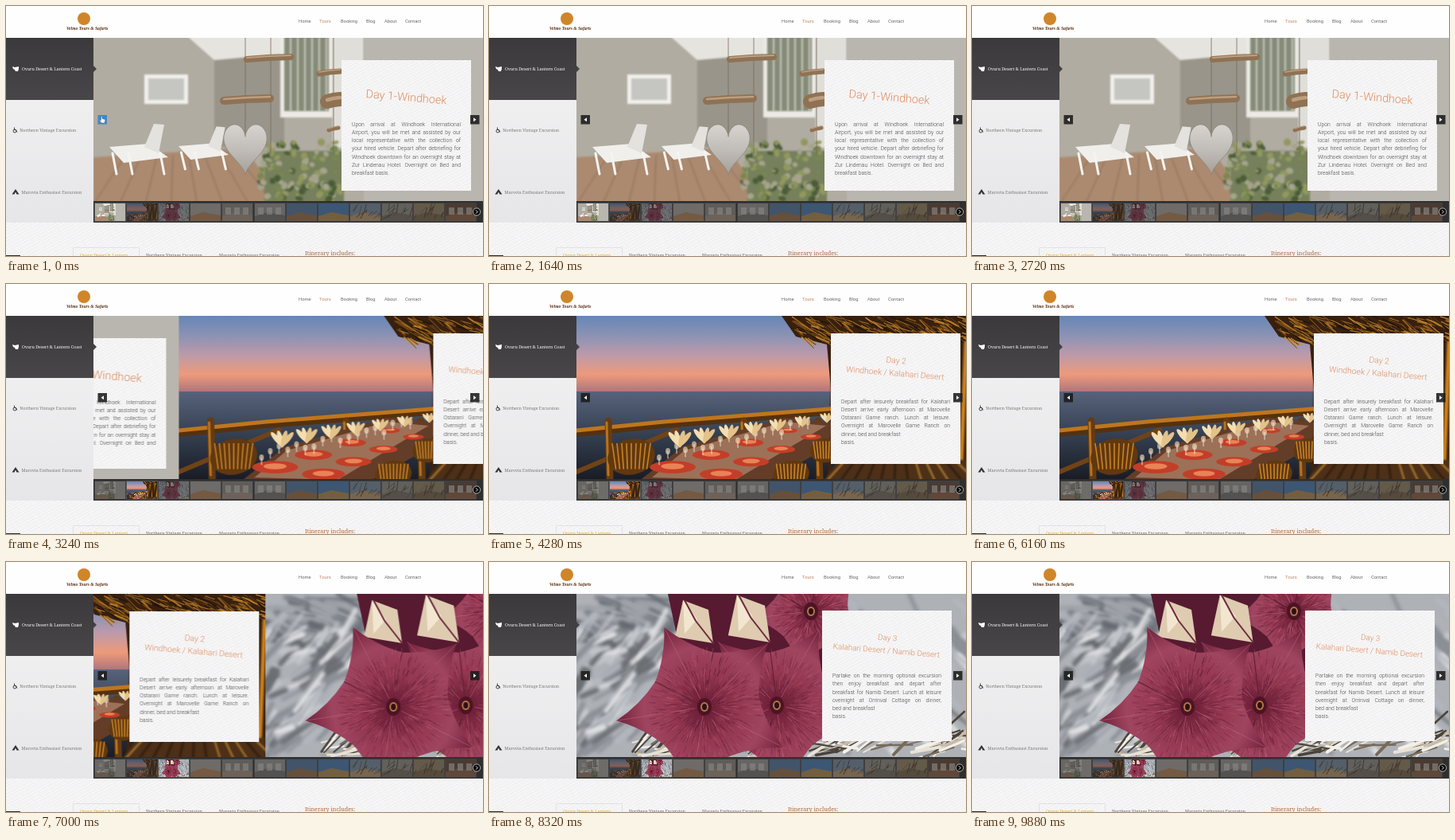
These frames come from a looping animation (600 px wide and 314 px high, 10 s). An HTML page with a canvas:

```html
<!DOCTYPE html>
<html lang="en">
<head>
<meta charset="utf-8">
<title>Safari tour slider</title>
<style>
html, body { margin: 0; width: 100%; height: 100%; overflow: hidden; }
#stage { position: relative; width: 600px; height: 314px; overflow: hidden; }
#stage, .panel {
  background: repeating-linear-gradient(28deg, #0000 0 2px, #e9e7ea66 2px 3px),
    repeating-linear-gradient(-28deg, #0000 0 3px, #fff8 3px 4px), #f5f4f5;
}
#slider { position: absolute; left: 110px; top: 40px; width: 490px; height: 205px; overflow: hidden; }
#track { position: absolute; display: flex; will-change: transform; }
.slide { position: relative; flex: none; width: 491px; height: 205px; }
.panel { position: absolute; width: 163px; height: 163.5px; font: 300 6.8px/10.25px Roboto, sans-serif; color: #444; }
.panel h2 {
  position: absolute; left: -20px; width: 203px; margin: 0; text-align: center; white-space: nowrap;
  font-weight: 300; line-height: 15.5px; color: #dc8c5c; transform: translateY(-50%) rotate(4.7deg);
}
.panel div { position: absolute; left: 13px; width: 137px; white-space: nowrap; }
.panel p { margin: 0; text-align: justify; }
.panel .full { text-align-last: justify; }
#strip { position: absolute; left: 110px; top: 245px; width: 490px; height: 27px; background: #2f2f30; overflow: hidden; }
#strip canvas { position: absolute; top: 2.5px; outline: .5px solid #555; }
svg { position: absolute; left: 0; top: 0; }
.serif { font: 5.3px "Noto Serif", serif; }
.menu { font: 5.8px Roboto, sans-serif; fill: #666; }
</style>
</head>
<body>
<div id="stage">
  <div id="slider"><div id="track"></div></div>
  <div id="strip"></div>
  <svg width="600" height="314" viewBox="0 0 600 314">
    <defs>
      <linearGradient id="dark" x2="0" y2="1"><stop stop-color="#3b393b"/><stop offset="1" stop-color="#484648"/></linearGradient>
      <linearGradient id="pale" x2="0" y2="1"><stop stop-color="#efeff0"/><stop offset="1" stop-color="#e6e6e8"/></linearGradient>
    </defs>
    <path fill="#fefefe" d="M0 0H600V40H0z"/>
    <circle cx="98" cy="16" r="8" fill="#cf852a"/>
    <text x="76" y="29.5" font-family="Liberation Serif, serif" font-size="5.6" font-style="italic" font-weight="bold" fill="#5a2d12">Velmo Tours &amp; Safaris</text>
    <g class="menu">
      <text x="368" y="21.3">Home</text><text x="394" y="21.3" fill="#c08560">Tours</text>
      <text x="421" y="21.3">Booking</text><text x="453" y="21.3">Blog</text>
      <text x="476" y="21.3">About</text><text x="502" y="21.3">Contact</text>
    </g>
    <path fill="url(#pale)" d="M0 118H110V272H0z"/>
    <path fill="url(#dark)" d="M0 40H110V118H0z"/>
    <path fill="#434143" d="M110 75l4 4-4 4z"/>
    <g class="serif" fill="#777">
      <text x="20" y="80.6" fill="#fff">Ovaru Desert &amp; Lantern Coast</text>
      <text x="17.3" y="158">Northern Vintage Excursion</text>
      <text x="19.5" y="235.5">Marovia Enthusiast Excursion</text>
    </g>
    <path fill="#fff" d="M8 76l3 1 5-1v3l-1 3h-3l-1-2-2-1z"/>
    <g fill="none" stroke="#444"><circle cx="11" cy="157" r="2"/><path d="M10.5 152.5v3h2l1.5 3"/></g>
    <path fill="#333" d="M12 230l4.5 6.5h-3L12 233.5l-1.5 3h-3z"/>
    <path fill="none" stroke="#e2e1e3" d="M84.5 314V303.5H167.5V314"/>
    <g class="serif" fill="#666">
      <text x="93" y="315" fill="#dfb018">Ovaru Desert &amp; Lantern</text>
      <text x="176" y="315">Northern Vintage Excursion</text>
      <text x="268" y="315">Marovia Enthusiast Excursion</text>
      <text x="376" y="312.8" style="font-size:7.2px" fill="#a8673c">Itinerary includes:</text>
    </g>
    <path fill="#2a2a22" d="M0 313H18V314H0z"/>
    <path id="prev" fill-opacity=".88" d="M115.5 137H127V148.5H115.5z"/>
    <path id="prevMark" fill="#fff" d="M123 140.3v5l-3.5-2.5z"/>
    <path fill="#1c1c1c" fill-opacity=".88" d="M584 137H595.5V148.5H584z"/>
    <path fill="#fff" d="M588 140.3v5l3.5-2.5z"/>
    <circle cx="592" cy="258.5" r="4.6" stroke="#ddd" stroke-width=".8"/>
    <path fill="none" stroke="#fff" d="M591 256.3l2.2 2.2-2.2 2.2"/>
    <path id="hand" fill="#fff" stroke="#456" stroke-width=".5" d="M119.5 139q1-1 1.5 0v2.500l3 .8q1 .3.800 1.500L124 147h-4l-2.500-3.500q0-1 2 .3z"/>
  </svg>
</div>
<script>
const WIDTH = 491, HEIGHT = 205, LEFT = 110, TOP = 40, LOOP = 10000;
const STARTS = [2840, 6783], TAU = 270, FADE = 200, HOVER_END = 440;
const $ = id => document.getElementById(id);
const lerp = (a, b, u) => a + (b - a) * u;
const times = (n, fn) => { for (let i = 0; i < n; i++) fn(i, i / (n - 1)); };

let seed = 7, g;
const rnd = (a, b) => lerp(a, b, (seed = seed * 16807 % 2147483647) / 2147483647);
const pick = list => list[Math.floor(rnd(0, list.length))];

// Drawing helpers work on the current context, in stage coordinates.
function makeCanvas(w, h) {
  const c = document.createElement('canvas');
  c.width = w; c.height = h;
  g = c.getContext('2d');
  return c;
}
function trace(pts) {
  g.beginPath();
  for (let i = 0; i < pts.length; i += 2) g.lineTo(pts[i], pts[i + 1]);
}
function poly(color, ...pts) { trace(pts); g.fillStyle = color; g.fill(); }
function line(color, width, ...pts) {
  trace(pts); g.lineCap = g.lineJoin = 'round';
  g.strokeStyle = color; g.lineWidth = width; g.stroke();
}
function rect(color, x, y, w, h) { g.fillStyle = color; g.fillRect(x, y, w, h); }
function oval(color, x, y, rx, ry = rx, turn = 0) {
  g.beginPath(); g.ellipse(x, y, rx, ry, turn, 0, 7); g.fillStyle = color; g.fill();
}
function shade(y0, y1, ...colors) {
  const s = g.createLinearGradient(0, y0, 0, y1);
  colors.forEach((c, i) => s.addColorStop(i / (colors.length - 1), c));
  return s;
}
const soft = px => g.filter = px ? `blur(${px}px)` : 'none';
function blobs(n, colors, x, y, w, h, r) {
  times(n, () => oval(pick(colors), rnd(x, x + w), rnd(y, y + h), rnd(r / 2, r), rnd(r / 3, r), rnd(0, 3)));
}
function streaks(n, colors, x, y, w, h, length, angle, spread, thick) {
  times(n, () => {
    const px = rnd(x, x + w), py = rnd(y, y + h), a = angle + rnd(-spread, spread), d = rnd(length / 3, length);
    line(pick(colors), rnd(thick / 3, thick), px, py, px + d * Math.cos(a), py + d * Math.sin(a));
  });
}

function lounger(x, y, s) {
  poly('#f0efec', x, y, x + 50 * s, y - 4 * s, x + 74 * s, y + 13 * s, x + 18 * s, y + 20 * s);
  poly('#e3e2de', x + 44 * s, y, x + 56 * s, y - 29 * s, x + 69 * s, y - 28 * s, x + 62 * s, y + 8 * s);
  for (const dx of [4, 24, 64]) line('#f5f4f1', 3, x + dx * s, y + 8, x + dx * s + 5, y + 34 * s);
}
function driftwood(x, y, w, thick) {
  line('#8f7254', thick, x, y, x + w / 2, y - 2, x + w, y - 3);
  line('#bd9f80', thick / 4, x, y - 2, x + w / 2, y - 4, x + w, y - 5);
}
function heart(cx, cy, sx, sy) {
  const pts = [];
  times(60, (i, u) => {
    const a = u * 2 * Math.PI;
    pts.push(cx + sx * Math.sin(a) ** 3 * 16,
      cy - sy * (13 * Math.cos(a) - 5 * Math.cos(2 * a) - 2 * Math.cos(3 * a) - Math.cos(4 * a)));
  });
  poly(shade(148, 214, '#d8d5d0', '#c0bcb7', '#a29d97'), ...pts);
  line('#8b847c', .8, ...pts);
}
function patio() {
  rect('#b1aca1', LEFT, TOP, WIDTH, HEIGHT);
  soft(1);
  rect('#99958a', 262, 62, 88, 115);
  poly('#e6e4df', 228, 38, 352, 38, 352, 60, 262, 68);
  rect('#f1f0ec', 174, 86, 55, 37);
  rect('#c5c6c1', 179, 91, 45, 27);
  rect('#eceae5', 345, 38, 66, 102);
  rect('#868b78', 350, 38, 56, 94);
  times(6, i => line('#dfded8', 1.5, 358 + i * 9, TOP, 358 + i * 9, 132));
  rect('#e0ded8', 411, 38, 39, 140);
  rect('#b9b6af', 450, 38, 152, 210);
  poly('#ab8a70', 110, 190, 300, 178, 350, 248, 110, 248);
  times(8, i => line('#856650', .8, 150 + i * 20, 188, 112 + i * 32, 246));
  rect('#76805c', 325, 182, 100, 65);
  blobs(110, ['#78884f', '#4a5c38', '#91985f', '#a5a48c'], 318, 170, 104, 75, 5);
  soft(.5);
  lounger(130, 177, 1);
  lounger(217, 176, .85);
  soft(0);
  for (const x of [301, 333, 412]) line('#786b5c', .8, x, TOP, x, 185);
  driftwood(303, 67, 55, 8);
  driftwood(274, 119, 58, 10);
  driftwood(394, 85, 26, 7);
  driftwood(404, 120, 16, 18);
  driftwood(406, 156, 12, 5);
  heart(301, 175, 1.7, 2.2);
}

function napkin(x, y, s) {
  for (const a of [-.7, -.25, .25, .7])
    oval(a > 0 ? '#e3c38a' : '#f4deb0', x + a * 9 * s, y - 3 * s, 3 * s, 10 * s, a);
}
function placemat(x, y, r) {
  oval('#c33e28', x, y, r, r * .27);
  oval('#e98355', x, y - 1, r * .5, r * .13);
}
function chair(x, y, w) {
  oval('#61380f', x, y, w, w * .75, -.2);
  times(9, (i, u) => line('#c98428', 1.6, x + (u - .5) * w * 1.6, y - w * .55, x + (u - .5) * w * 1.3, y + w * .5));
}
function dinner() {
  rect(shade(TOP, 138, '#6687b6', '#8b92b4', '#bc9aaa', '#ed9a7b', '#a8707c'), LEFT, TOP, WIDTH, 98);
  rect(shade(135, 245, '#57637b', '#343f50', '#191c25'), LEFT, 135, WIDTH, 110);
  poly('#38200f', 368, TOP, 601, TOP, 601, 245, 440, 245, 425, 76, 386, 66);
  streaks(260, ['#754817', '#23150d', '#aa7224', '#c98a2c'], 380, 40, 220, 30, 26, .5, .3, 1.5);
  soft(1);
  times(16, i => line(pick(['#cf851e', '#8d541c', '#40240e']), 5, 435 + i * 11, 74, 428 + i * 11, 248));
  poly('#4d3017', 420, 248, 440, 221, 601, 221, 601, 248);
  times(12, i => line(pick(['#b98336', '#2a190c']), 2, 425 + i * 17, 247, 446 + i * 13, 224));
  soft(0);
  for (const [color, w, dy] of [['#55310f', 10, 0], ['#bf761d', 5, -3]])
    line(color, w, LEFT, 187 + dy, 220, 176 + dy, 440, 159 + dy);
  line('#704316', 6, LEFT, 236, 236, 183);
  for (const x of [150, 320, 414]) {
    line('#653b13', 9, x, 172, x + 2, 244);
    line('#b8731d', 3, x - 2, 174, x, 240);
  }
  poly('#633d28', 188, 248, 244, 204, 372, 168, 434, 174, 426, 205, 350, 248);
  poly('#9c7158', 205, 243, 246, 209, 372, 173, 424, 178, 310, 246);
  times(4, (i, u) => {
    placemat(lerp(231, 376, u), lerp(230, 184, u), lerp(29, 12, u));
    placemat(lerp(292, 405, u), lerp(239, 192, u), lerp(27, 13, u));
  });
  times(18, i => {
    const x = 214 + i * 11, y = 222 - i * 2.4 + rnd(-5, 7);
    line('#e7ded0', 1, x, y, x, y - 9);
    oval('#f3dfc1a0', x, y - 9, 3, 4);
  });
  times(7, (i, u) => napkin(lerp(240, 425, u), lerp(198, 170, u), lerp(1.1, .65, u)));
  chair(179, 217, 30);
  chair(380, 239, 23);
  chair(424, 209, 20);
}

// A broad star: each petal is a curve from notch to tip to notch.
function flower(cx, cy, r, turn, petals = 5) {
  const at = (a, d) => [cx + d * Math.cos(a), cy + d * Math.sin(a)], step = Math.PI / petals;
  const fill = g.createRadialGradient(cx, cy, 5, cx, cy, r);
  ['#6a1c35', '#93364f', '#a04560', '#70203a'].forEach((c, i) => fill.addColorStop(i / 3, c));
  times(petals, i => {
    const a = turn + i * 2 * step;
    g.beginPath();
    g.moveTo(cx, cy);
    g.lineTo(...at(a - step, r * .62));
    g.quadraticCurveTo(...at(a - step * .3, r * .72), ...at(a, r));
    g.quadraticCurveTo(...at(a + step * .3, r * .72), ...at(a + step, r * .62));
    g.fillStyle = fill; g.fill();
    line('#b4647a99', 1, ...at(a, 12), ...at(a, r));
    line('#45142499', 1.2, cx, cy, ...at(a + step, r * .62));
    times(90, () => {
      const b = a + rnd(-step, step), d = rnd(.15, .6) * r;
      line(pick(['#bd667f55', '#4c142c55']), 1, ...at(b, d), ...at(b, d + r * .07));
    });
  });
  oval('#4c1424', cx, cy, 9, 11);
  oval('#b77745', cx, cy, 5, 6);
  oval('#2c1018', cx, cy, 3, 4);
}
function bud(x, y, s) {
  poly('#decbb0', x - 22 * s, y + 22 * s, x - 12 * s, y - 24 * s, x + 20 * s, y - 12 * s, x + 26 * s, y + 30 * s);
  poly('#f3e6d0', x - 12 * s, y - 24 * s, x + 6 * s, y, x - 10 * s, y + 18 * s);
  line('#6c2a3c', 2, x - 10 * s, y - 24 * s, x + 4 * s, y + 2, x + 26 * s, y + 30 * s);
}
function blossom() {
  const grays = ['#dfe0e2', '#c3c6cb', '#8b8f96', '#b2b6bd', '#6b6e73'];
  const straw = ['#e9e2d5', '#c9bca6', '#766a5a', '#4b443c', '#f4f0e8'];
  rect('#aeb1b6', LEFT, TOP, WIDTH, HEIGHT);
  soft(2);
  streaks(60, ['#7e838b', '#9ea2a9', '#65696f'], 90, 40, 120, 60, 60, .35, .4, 10);
  streaks(110, grays, 90, 95, 150, 150, 60, -.7, .5, 9);
  streaks(60, grays, 420, 40, 180, 170, 60, .8, .5, 10);
  soft(.7);
  streaks(130, straw, 180, 218, 420, 28, 50, -.4, .6, 4);
  poly('#571a31', 225, TOP, 422, TOP, 422, 140, 300, 165, 240, 110);
  soft(0);
  flower(405, 62, 75, -2);
  bud(256, 72, 1);
  bud(325, 68, 1.1);
  flower(362, 180, 108, -1.06);
  flower(271, 182, 112, -2.04);
}

// Remaining thumbnails: one sky and one ground colour each, rooms get windows, bush gets twigs.
const SKIES = '#bcb5ad #9a938b #aaa8a4 #5782ae #4e87c4 #829bb0 #a19d91 #a59068 #6c4b35'.split(' ');
const GROUNDS = '#c98d5c #b7a08b #817d78 #a9784b #c79b53 #cda875 #827766 #836e4d #9b6747'.split(' ');
function drawScene(i) {
  const room = [1, 2, 8].includes(i);
  rect(SKIES[i], 0, 0, 38, 22);
  poly(GROUNDS[i], 0, 16, 16, 11, 38, 15, 38, 22, 0, 22);
  if (room) times(3, k => rect('#f0ece6aa', 4 + k * 11, 5, 7, 9));
  else if (i > 4) streaks(14, ['#4a3928', '#3c342b'], 0, 8, 38, 12, 14, -1, .5, 1);
}

const SLIDES = [
  { draw: patio, x: 422, y: 68, title: 'Day 1-Windhoek', size: 14.4, titleY: 47, textY: 75.5,
    text: ['Upon arrival at Windhoek International', 'Airport, you will be met and assisted by our',
      'local representative with the collection of', 'your hired vehicle. Depart after debriefing for',
      'Windhoek downtown for an overnight stay at', 'Zur Lindenau Hotel. Overnight on Bed and'],
    rest: 'breakfast basis.' },
  { draw: dinner, x: 430, y: 62, title: 'Day 2<br>Windhoek / Kalahari Desert', size: 10.4, titleY: 41.5, textY: 80.5,
    text: ['Depart after leisurely breakfast for Kalahari', 'Desert arrive early afternoon at Marovelle',
      'Ostarani Game ranch. Lunch at leisure.', 'Overnight at Marovelle Game Ranch on'],
    rest: 'dinner, bed and breakfast<br>basis.' },
  { draw: blossom, x: 419, y: 61, title: 'Day 3<br>Kalahari Desert / Namib Desert', size: 9.9, titleY: 41.5, textY: 77,
    text: ['Partake on the morning optional excursion', 'then enjoy breakfast and depart after',
      'breakfast for Namib Desert. Lunch at leisure', 'overnight at Orrinval Cottage on dinner,'],
    rest: 'bed and breakfast<br>basis.' }
];

const photos = SLIDES.map(s => {
  const slide = document.createElement('div');
  slide.className = 'slide';
  slide.innerHTML = `<div class="panel" style="left:${s.x - LEFT}px;top:${s.y - TOP}px">
    <h2 style="top:${s.titleY}px;font-size:${s.size}px">${s.title}</h2>
    <div style="top:${s.textY}px"><p class="full">${s.text.join('<br>')}</p><p>${s.rest}</p></div></div>`;
  const photo = makeCanvas(WIDTH, HEIGHT);
  g.translate(-LEFT, -TOP);
  s.draw();
  slide.prepend(photo);
  $('track').append(slide);
  return photo;
});

const thumbs = Array.from({ length: 12 }, (_, i) => {
  const c = makeCanvas(38, 22);
  if (photos[i]) g.drawImage(photos[i], 0, 0, 38, 22);
  else drawScene(i - photos.length);
  c.style.left = 2 + i * 40.1 + 'px';
  c.style.opacity = .45;
  $('strip').append(c);
  return c;
});

const clamp = v => Math.max(0, Math.min(1, v));
const glide = t => clamp(1.01 * (1 - Math.exp(-t / TAU)));

function render(now) {
  const t = now % LOOP;
  const shift = STARTS.reduce((sum, s) => sum + glide(t - s), 0);
  $('track').style.transform = `translateX(${-WIDTH * shift}px)`;

  const [a, b] = STARTS.map(s => clamp((t - s) / FADE));
  [1 - a, a - b, b].forEach((on, i) => thumbs[i].style.opacity = lerp(.45, 1, on));

  const hover = t < HOVER_END;
  $('prev').setAttribute('fill', hover ? '#2f86c8' : '#1c1c1c');
  $('prevMark').style.display = hover ? 'none' : '';
  $('hand').style.display = hover ? '' : 'none';
}
const start = performance.now();
function tick() {
  render(performance.now() - start);
  requestAnimationFrame(tick);
}
tick();
</script>
</body>
</html>
```
